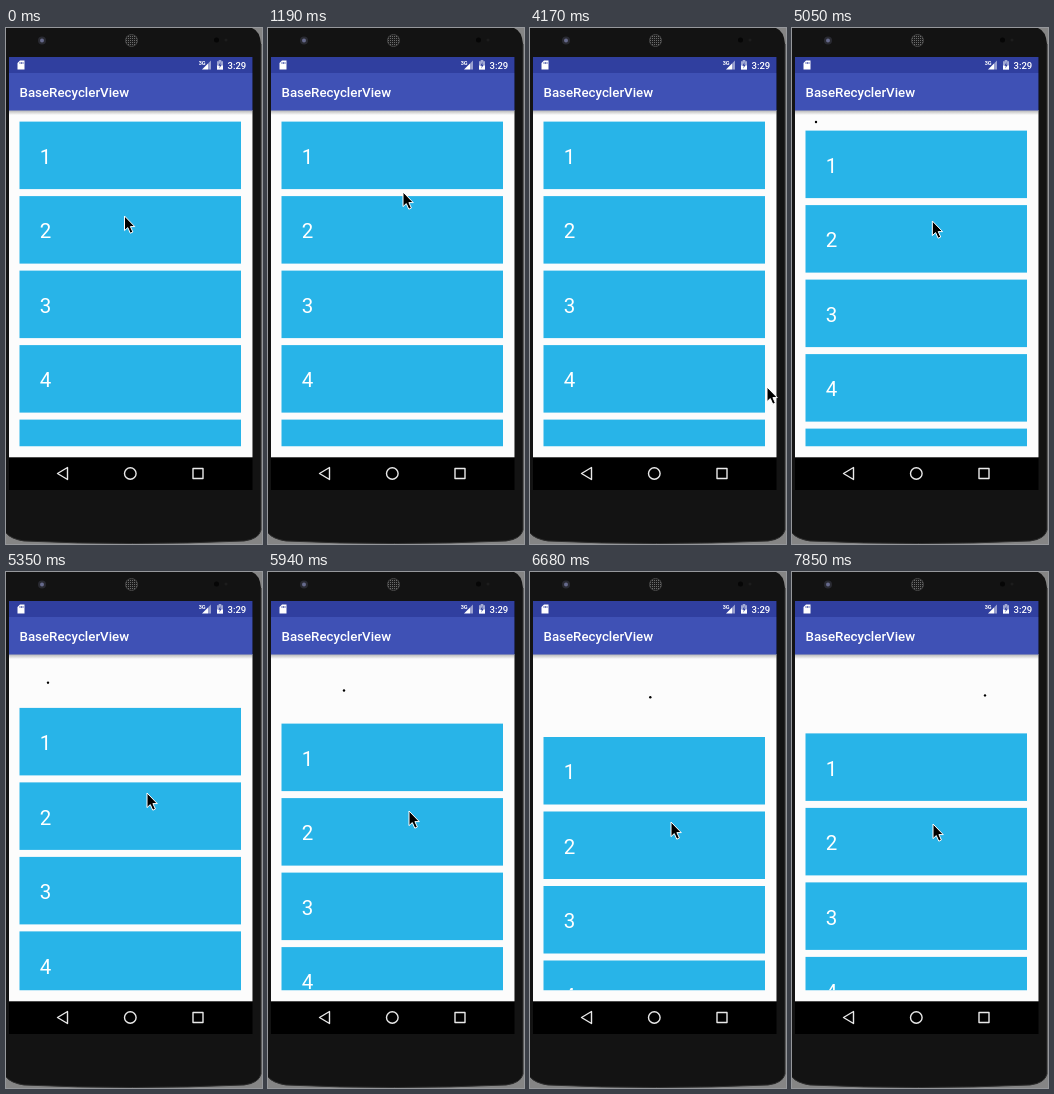
An HTML page for the animation above (8000 ms loop, 256 px wide and 516 px high).

```html
<!DOCTYPE html>
<html lang="en">
<head>
<meta charset="utf-8">
<title>Pull to refresh</title>
<style>
  html, body { margin: 0; width: 100%; height: 100%; overflow: hidden; background: #858585; }
  svg { display: block; width: 100vw; height: 100vh; }
  text { font-family: Roboto, sans-serif; fill: #fff; }
  .title { font-size: 13.3px; font-weight: 500; }
  .clock { font-size: 9.5px; font-weight: 500; }
  .row { font-size: 20.5px; }
  .nav { fill: none; stroke: #e9e9e9; stroke-width: 1.4; stroke-linejoin: round; }
</style>
</head>
<body>
<svg viewBox="0 0 256 516" preserveAspectRatio="none">
  <defs>
    <linearGradient id="shade" x2="0" y2="1">
      <stop offset="0" stop-color="#000" stop-opacity=".3"/>
      <stop offset="1" stop-color="#000" stop-opacity="0"/>
    </linearGradient>
    <pattern id="mesh" width="2" height="2" patternUnits="userSpaceOnUse">
      <rect width="2" height="2" fill="#1c1c1c"/>
      <rect width="1" height="1" fill="#6b6b6b"/>
    </pattern>
    <clipPath id="list"><rect x="3" y="83" width="243" height="335.3"/></clipPath>
  </defs>

  <!-- Phone body -->
  <path d="M0 0H246Q254 3 255 16V502Q253 511 238 513Q125 518 18 513Q5 511 0 505Z" fill="#131313"/>
  <path d="M0 505Q5 511 18 513Q125 518 238 513Q253 511 255 502V16" fill="none" stroke="#303030"/>
  <circle cx="36" cy="12.5" r="4" fill="#292a31"/>
  <circle cx="36" cy="12.5" r="2" fill="#666a8c"/>
  <circle cx="125.5" cy="12.5" r="6" fill="url(#mesh)" stroke="#444"/>
  <circle cx="210.5" cy="12" r="2.5" fill="#060606"/>
  <circle cx="220" cy="12" r="1.5" fill="#1d1d1d"/>

  <!-- Screen -->
  <rect x="3" y="29" width="243.5" height="433" fill="#000"/>
  <rect x="3" y="82" width="243.5" height="347.3" fill="#fcfcfc"/>
  <g clip-path="url(#list)">
    <circle id="dot" r="1.2" fill="#000"/>
    <g id="rows"></g>
  </g>
  <rect x="3" y="82" width="243.5" height="5" fill="url(#shade)"/>
  <rect x="3" y="45" width="243.5" height="37.5" fill="#3f51b5"/>
  <rect x="3" y="29" width="243.5" height="16" fill="#303f9f"/>
  <text class="title" x="13.5" y="69">BaseRecyclerView</text>

  <!-- Status icons -->
  <path d="M14 32.5H18.5V41.5H11.5V35Z" fill="#fff"/>
  <path d="M14 34v2M15.5 34v2M17 34v2" stroke="#303f9f" stroke-width=".7"/>
  <text x="192.7" y="36.5" font-size="5.5" font-weight="700">3G</text>
  <path d="M196 41.5L202 35.5V41.5Z" fill="#fff"/>
  <path d="M202 35.5L205 32.5V41.5H202Z" fill="#fff" opacity=".5"/>
  <path d="M211 33.2H212.7V32H215.3V33.2H217V41.5H211Z" fill="#fff" opacity=".55"/>
  <path d="M211 37.5H217V41.5H211Z" fill="#fff"/>
  <path d="M214.6 34L212.4 37.8H213.8L213.4 40.4L215.6 36.8H214.2Z" fill="#303f9f"/>
  <text class="clock" x="221.5" y="40.5">3:29</text>

  <!-- Navigation -->
  <path class="nav" d="M61.5 439.5V451.5L51.5 445.5Z"/>
  <circle class="nav" cx="124.3" cy="445.5" r="5.8"/>
  <rect class="nav" x="187" y="440.5" width="10" height="10"/>

  <path id="cursor" d="M0 0V14.6L3.3 11.6L5.8 17.2L8.4 16L5.9 10.6H10.3Z" fill="#000" stroke="#fff" stroke-width="1" stroke-linejoin="round"/>
</svg>
<script>
const LOOP = 8000;
const STEP = 148.1;
const HIDE_FROM = 15, HIDE_TO = 28;

// [step, value, ...]
const cursorPath = [
  [0, 118.5, 188], [1, 118.5, 189], [2, 118.3, 190], [6, 118.3, 190],
  [7, 115, 180], [8, 135, 164], [9, 170, 180], [10, 200, 210], [11, 216, 228],
  [12, 216, 228], [13, 230, 260], [14, 246, 300],
  [28, 237, 359], [29, 200, 285], [30, 162, 220], [31, 136, 185], [32, 140, 179],
  [33, 140, 179], [36, 141, 221], [37, 141, 227], [40, 141, 239],
  [45, 141, 250], [48, 141, 252], [53, 141, 252]
];
const pullPath = [
  [0, 0], [33, 0], [34, 9], [36, 42.3], [37, 48], [38, 52], [40, 58],
  [42, 64.5], [45, 71.4], [48, 73], [51, 73], [53, 67.8]
];
const dotPath = [[34, 24], [36, 42], [40, 76], [45, 120.3], [53, 193]];

function sample(path, step) {
  let i = path.findIndex(key => key[0] > step);
  if (i < 0) i = path.length;
  const a = path[Math.max(i - 1, 0)];
  const b = path[Math.min(i, path.length - 1)];
  const k = b[0] > a[0] ? (step - a[0]) / (b[0] - a[0]) : 0;
  return a.slice(1).map((v, n) => v + (b[n + 1] - v) * k);
}

const byId = id => document.getElementById(id);
const rows = byId("rows"), dot = byId("dot"), cursor = byId("cursor");
const move = (node, x, y) => node.setAttribute("transform", `translate(${x} ${y})`);

rows.innerHTML = [1, 2, 3, 4, 5].map((n, i) => {
  const y = 93.6 + i * 74.5;
  return `<rect x="13.5" y="${y}" width="221.5" height="67.5" fill="#28b4e8"/>
    <text class="row" x="33.7" y="${y + 42.2}">${n}</text>`;
}).join("");

function draw(now) {
  const step = Math.floor((now % LOOP) / STEP);
  const [pull] = sample(pullPath, step);
  move(rows, 0, pull);
  move(dot, sample(dotPath, step)[0], 89.5 + pull / 2);
  dot.style.display = pull > 0 ? "" : "none";
  move(cursor, ...sample(cursorPath, step));
  cursor.style.display = step >= HIDE_FROM && step < HIDE_TO ? "none" : "";
}

const start = performance.now();
function tick() {
  draw(performance.now() - start);
  requestAnimationFrame(tick);
}
tick();
</script>
</body>
</html>
```
